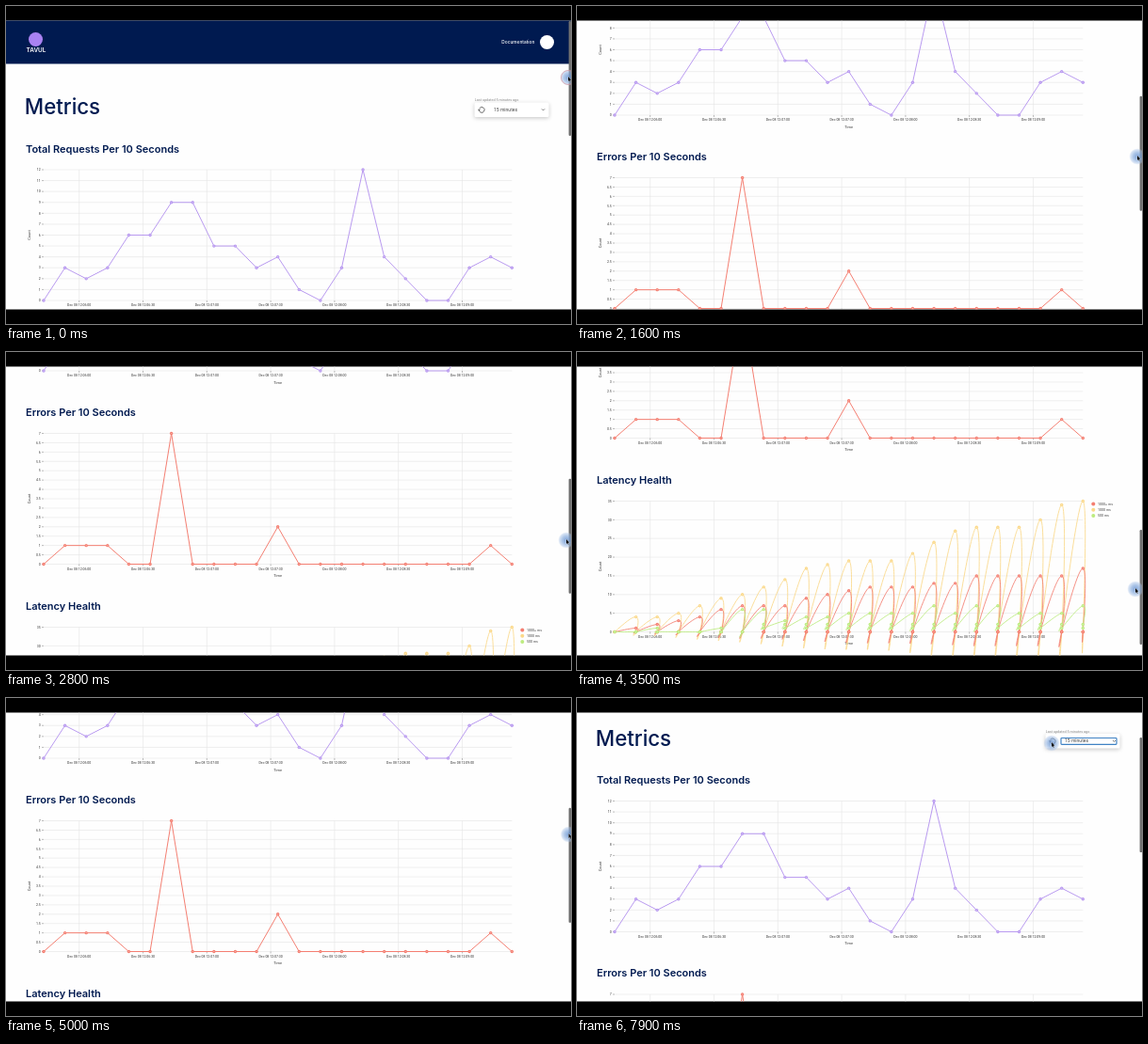
Write an HTML page with a canvas that moves like this. It is 600x338 px and loops after 8 s.

```html
<!DOCTYPE html>
<html lang="en">
<head>
<meta charset="utf-8">
<title>Metrics dashboard</title>
<style>
  html, body { margin: 0; width: 100%; height: 100%; overflow: hidden; background: #000; }
  canvas { display: block; width: 100vw; height: 100vh; }
</style>
</head>
<body>
<canvas id="stage"></canvas>
<script>
const W = 600, H = 338, LOOP = 8000, STEP = 100;
const NAVY = '#001a50', PURPLE = '#b99af0', RED = '#f47f72', YELLOW = '#fbd98a', GREEN = '#bdec80';
const LEFT = 40, RIGHT = 537.3, DX = (RIGHT - LEFT) / 22, PLOT_H = 139;
const UI = 'Roboto, sans-serif', HEAD = 'Inter, sans-serif';

const canvas = document.getElementById('stage');
const ctx = canvas.getContext('2d');

// Motion keys: [time, value]
const scrollKeys = [[0, 0], [200, 0], [1600, 197], [2800, 293], [3500, 427], [4000, 427],
  [5000, 249], [5450, 64.5], [LOOP, 64.5]];
const pointerX = [[0, 597], [1600, 595], [2800, 595], [3500, 593], [4000, 593], [5000, 597.5],
  [5500, 597], [6200, 558], [7300, 558], [7800, 504], [LOOP, 504]];
const pointerY = [[0, 76], [200, 76], [1600, 160], [2800, 200], [3500, 252], [4000, 252],
  [5000, 145], [5400, 104], [5600, 99], [6200, 47], [7300, 47], [7800, 48], [LOOP, 48]];
const MENU_OPEN = 6400, MENU_CLOSE = 7300;

const requests = [0, 3, 2, 3, 6, 6, 9, 9, 5, 5, 3, 4, 1, 0, 3, 12, 4, 2, 0, 0, 3, 4, 3];
const errors = [0, 1, 1, 1, 0, 0, 7, 0, 0, 0, 0, 2, 0, 0, 0, 0, 0, 0, 0, 0, 0, 1, 0];
const slow = [1, 2, 3, 4, 6, 7, 7, 7, 9, 10, 11, 12, 12, 12, 13, 13, 15, 15, 15, 15, 15, 17];
const medium = [4, 4, 5, 7, 9, 10, 12, 14, 17, 18, 19, 19, 19, 21, 24, 27, 28, 28, 28, 30, 34, 35];
const fast = [0, 1, 0, 0, 1, 6, 6, 3, 4, 4, 5, 5, 5, 5, 7, 5, 7, 7, 5, 5, 5, 7];

// Monotone cubic interpolation between keys
function track(keys, t) {
  let i = 0;
  while (i < keys.length - 2 && t >= keys[i + 1][0]) i++;
  const slope = k => k < 0 || k > keys.length - 2 ? 0
    : (keys[k + 1][1] - keys[k][1]) / (keys[k + 1][0] - keys[k][0]);
  const tangent = k => {
    const a = slope(k - 1), b = slope(k);
    return a * b <= 0 ? 0 : 2 * a * b / (a + b);
  };
  const [t0, v0] = keys[i], [t1, v1] = keys[i + 1], d = t1 - t0, u = (t - t0) / d;
  const u2 = u * u, u3 = u2 * u;
  return (2 * u3 - 3 * u2 + 1) * v0 + (u3 - 2 * u2 + u) * d * tangent(i)
    + (3 * u2 - 2 * u3) * v1 + (u3 - u2) * d * tangent(i + 1);
}

function text(str, x, y, font, color, align = 'left') {
  ctx.font = font;
  ctx.fillStyle = color;
  ctx.textAlign = align;
  ctx.textBaseline = 'middle';
  ctx.fillText(str, x, y);
}

function line(x0, y0, x1, y1, color, width) {
  ctx.beginPath();
  ctx.moveTo(x0, y0);
  ctx.lineTo(x1, y1);
  ctx.strokeStyle = color;
  ctx.lineWidth = width;
  ctx.stroke();
}

function disc(x, y, r, color) {
  ctx.beginPath();
  ctx.arc(x, y, r, 0, 7);
  ctx.fillStyle = color;
  ctx.fill();
}

function box(x, y, w, h, r) {
  ctx.beginPath();
  ctx.roundRect(x, y, w, h, r);
}

function chevron(x, y, size, color) {
  ctx.beginPath();
  ctx.moveTo(x - size, y - size / 2);
  ctx.lineTo(x, y + size / 2);
  ctx.lineTo(x + size, y - size / 2);
  ctx.strokeStyle = color;
  ctx.lineWidth = 0.8;
  ctx.stroke();
}

function axes(top, max, step) {
  const base = top + PLOT_H, small = '3.5px ' + UI;
  for (let v = 0; v <= max; v += step) {
    const y = base - v / max * PLOT_H;
    line(LEFT, y, RIGHT, y, '#e4e4e4', 0.6);
    line(LEFT - 2, y, LEFT, y, '#777', 0.5);
    text(String(v), LEFT - 3.2, y + 0.2, small, '#333', 'right');
  }
  for (let i = 0; i < 7; i++) {
    const x = 77.7 + i * 67.8;
    line(x, top, x, base, '#e4e4e4', 0.6);
    line(x, base, x, base + 2, '#777', 0.5);
    const minute = 6 + (i >> 1), second = i % 2 ? '30' : '00';
    text(`Dec 08 12:0${minute}:${second}`, x, base + 5, small, '#333', 'center');
  }
  text('Time', (LEFT + RIGHT) / 2, base + 12.4, '3.9px ' + UI, '#333', 'center');
  ctx.save();
  ctx.translate(24.7, top + PLOT_H / 2);
  ctx.rotate(-Math.PI / 2);
  text('Count', 0, 0, '3.9px ' + UI, '#333', 'center');
  ctx.restore();
}

function dots(points, color) {
  for (const [x, y] of points) {
    disc(x, y, 1.7, color);
    disc(x, y, 0.6, 'rgba(255,255,255,.45)');
  }
}

function lineChart(top, max, step, data, color) {
  axes(top, max, step);
  const points = data.map((v, i) => [LEFT + i * DX, top + PLOT_H * (1 - v / max)]);
  ctx.beginPath();
  points.forEach(p => ctx.lineTo(p[0], p[1]));
  ctx.strokeStyle = color;
  ctx.lineWidth = 1;
  ctx.lineJoin = 'round';
  ctx.stroke();
  dots(points, color);
}

// Bezier handles of a natural cubic spline along one coordinate
function handles(p) {
  const n = p.length - 1, a = [0], b = [2], r = [p[0] + 2 * p[1]];
  for (let i = 1; i < n; i++) {
    const last = i === n - 1;
    a[i] = last ? 2 : 1;
    b[i] = last ? 7 : 4;
    r[i] = last ? 8 * p[i] + p[n] : 4 * p[i] + 2 * p[i + 1];
    const m = a[i] / b[i - 1];
    b[i] -= m;
    r[i] -= m * r[i - 1];
  }
  a[n - 1] = r[n - 1] / b[n - 1];
  for (let i = n - 2; i >= 0; i--) a[i] = (r[i] - a[i + 1]) / b[i];
  for (let i = 0; i < n - 1; i++) b[i] = 2 * p[i + 1] - a[i + 1];
  b[n - 1] = (p[n] + a[n - 1]) / 2;
  return [a, b];
}

// Each column holds a peak followed by two low samples
function loops(top, peaks, color, low) {
  const points = [[LEFT, top + PLOT_H]];
  peaks.forEach((peak, i) => {
    const x = LEFT + (i + 1) * DX;
    for (const v of [peak, ...low(i)]) points.push([x, top + PLOT_H * (1 - v / 35)]);
  });
  const xs = points.map(p => p[0]), ys = points.map(p => p[1]);
  const [ax, bx] = handles(xs), [ay, by] = handles(ys);
  ctx.globalAlpha = 0.85;
  ctx.beginPath();
  ctx.moveTo(xs[0], ys[0]);
  for (let i = 0; i < xs.length - 1; i++) {
    ctx.bezierCurveTo(ax[i], ay[i], bx[i], by[i], xs[i + 1], ys[i + 1]);
  }
  ctx.strokeStyle = color;
  ctx.lineWidth = 1;
  ctx.stroke();
  ctx.globalAlpha = 1;
  dots(points, color);
}

function latencyChart(top) {
  axes(top, 35, 5);
  const zero = () => [0, 0];
  loops(top, medium, YELLOW, zero);
  loops(top, slow, RED, zero);
  loops(top, fast, GREEN, i => i > 5 ? [2, 1] : [0, 0]);
  [['1000+ ms', RED], ['1000 ms', YELLOW], ['500 ms', GREEN]].forEach(([label, color], i) => {
    const y = top + 3 + i * 6.25;
    disc(548.3, y, 2, color);
    text(label, 553, y + 0.2, '3.6px ' + UI, '#444');
  });
}

function header() {
  ctx.fillStyle = NAVY;
  ctx.fillRect(0, 0, W, 61.5);
  disc(31.5, 35.5, 7.5, '#a982f2');
  text('TAVUL', 32, 46.8, '600 6.4px ' + HEAD, '#fff', 'center');
  text('Documentation', 526.3, 38.6, '500 4.8px ' + HEAD, '#fff');
  disc(574.5, 38.5, 7.5, '#fff');
}

function picker(focused) {
  text('Last updated 5 minutes ago', 497.8, 100.2, '3.75px ' + UI, '#8a8a8a');
  ctx.save();
  ctx.shadowColor = 'rgba(0,0,0,.22)';
  ctx.shadowBlur = 4;
  ctx.shadowOffsetY = 1.2;
  box(497.5, 102.5, 79, 15.5, 1.5);
  ctx.fillStyle = '#fff';
  ctx.fill();
  ctx.restore();

  ctx.beginPath();
  ctx.arc(505.2, 110.4, 2.9, -2.6, 2.9);
  ctx.strokeStyle = '#666';
  ctx.lineWidth = 1;
  ctx.stroke();
  ctx.beginPath();
  ctx.moveTo(501, 109.8);
  ctx.lineTo(504, 109.8);
  ctx.lineTo(502.3, 112);
  ctx.fillStyle = '#666';
  ctx.fill();

  text('15 minutes', 518, 110.4, '5.05px ' + UI, '#444');
  chevron(570.5, 110.2, 1.5, '#555');
  if (focused) {
    box(514, 107, 59, 6.8, 0.8);
    ctx.strokeStyle = '#3f82c4';
    ctx.lineWidth = 1.2;
    ctx.stroke();
  }
}

function menu() {
  ctx.save();
  ctx.shadowColor = 'rgba(0,0,0,.4)';
  ctx.shadowBlur = 4;
  ctx.shadowOffsetY = 1.5;
  box(511, 41.5, 59, 37, 1.5);
  ctx.fillStyle = '#e9e9e9';
  ctx.fill();
  ctx.restore();
  box(511, 42, 59, 7.2, 0);
  ctx.fillStyle = '#2f86ee';
  ctx.fill();
  ctx.beginPath();
  ctx.moveTo(513.2, 45.8);
  ctx.lineTo(514.2, 47.2);
  ctx.lineTo(515.9, 44);
  ctx.strokeStyle = '#fff';
  ctx.lineWidth = 0.8;
  ctx.stroke();
  ['15 minutes', '1 hour', '4 hours', '24 hours', '1 week'].forEach((label, i) => {
    text(label, 517.5, 45.8 + i * 6.9, '5.2px ' + UI, i ? '#222' : '#fff');
  });
}

function pointer(x, y, t) {
  const glow = ctx.createRadialGradient(x, y, 0, x, y, 8.8);
  glow.addColorStop(0, 'rgba(95,140,205,.8)');
  glow.addColorStop(0.5, 'rgba(130,168,220,.65)');
  glow.addColorStop(0.82, 'rgba(165,192,230,.45)');
  glow.addColorStop(1, 'rgba(190,210,240,0)');
  disc(x, y, 8.8, glow);
  if (t < 200) {
    ctx.beginPath();
    ctx.arc(x, y, 7.5, 0, 7);
    ctx.strokeStyle = 'rgba(215,140,150,.8)';
    ctx.lineWidth = 0.8;
    ctx.stroke();
  }
  ctx.beginPath();
  for (const [dx, dy] of [[0, -1], [0, 4], [1.1, 3.1], [1.9, 4.8], [2.7, 4.4], [1.9, 2.8], [3.4, 2.6]]) {
    ctx.lineTo(x + dx, y + dy);
  }
  ctx.closePath();
  ctx.strokeStyle = 'rgba(255,255,255,.8)';
  ctx.lineWidth = 0.6;
  ctx.stroke();
  ctx.fillStyle = '#111';
  ctx.fill();
}

function draw(t) {
  const scroll = track(scrollKeys, t);
  ctx.fillStyle = '#000';
  ctx.fillRect(0, 0, W, H);
  ctx.save();
  ctx.beginPath();
  ctx.rect(0, 15.5, W, 307);
  ctx.clip();
  ctx.fillStyle = '#fefefe';
  ctx.fillRect(0, 0, W, H);

  ctx.save();
  ctx.translate(0, -scroll);
  header();
  text('Metrics', 19.8, 108.3, '500 22.3px ' + HEAD, NAVY);
  picker(t >= MENU_CLOSE);
  const title = '600 11px ' + HEAD;
  text('Total Requests Per 10 Seconds', 21, 152.3, title, NAVY);
  lineChart(174, 12, 1, requests, PURPLE);
  text('Errors Per 10 Seconds', 21, 357.5, title, NAVY);
  lineChart(379.5, 7, 0.5, errors, RED);
  text('Latency Health', 21, 563.5, title, NAVY);
  latencyChart(585.5);
  ctx.restore();

  box(597.6, 16 + scroll * 0.405, 2.6, 122, 1.2);
  ctx.fillStyle = '#707070';
  ctx.fill();
  if (t >= MENU_OPEN && t < MENU_CLOSE) menu();
  pointer(track(pointerX, t), track(pointerY, t), t);
  ctx.restore();
}

function resize() {
  const ratio = window.devicePixelRatio || 1;
  canvas.width = Math.round(innerWidth * ratio);
  canvas.height = Math.round(innerHeight * ratio);
}

const start = performance.now();
function frame() {
  const t = (performance.now() - start) % LOOP;
  ctx.setTransform(canvas.width / W, 0, 0, canvas.height / H, 0, 0);
  draw(Math.floor(t / STEP) * STEP);
  requestAnimationFrame(frame);
}

addEventListener('resize', resize);
resize();
frame();
</script>
</body>
</html>
```
